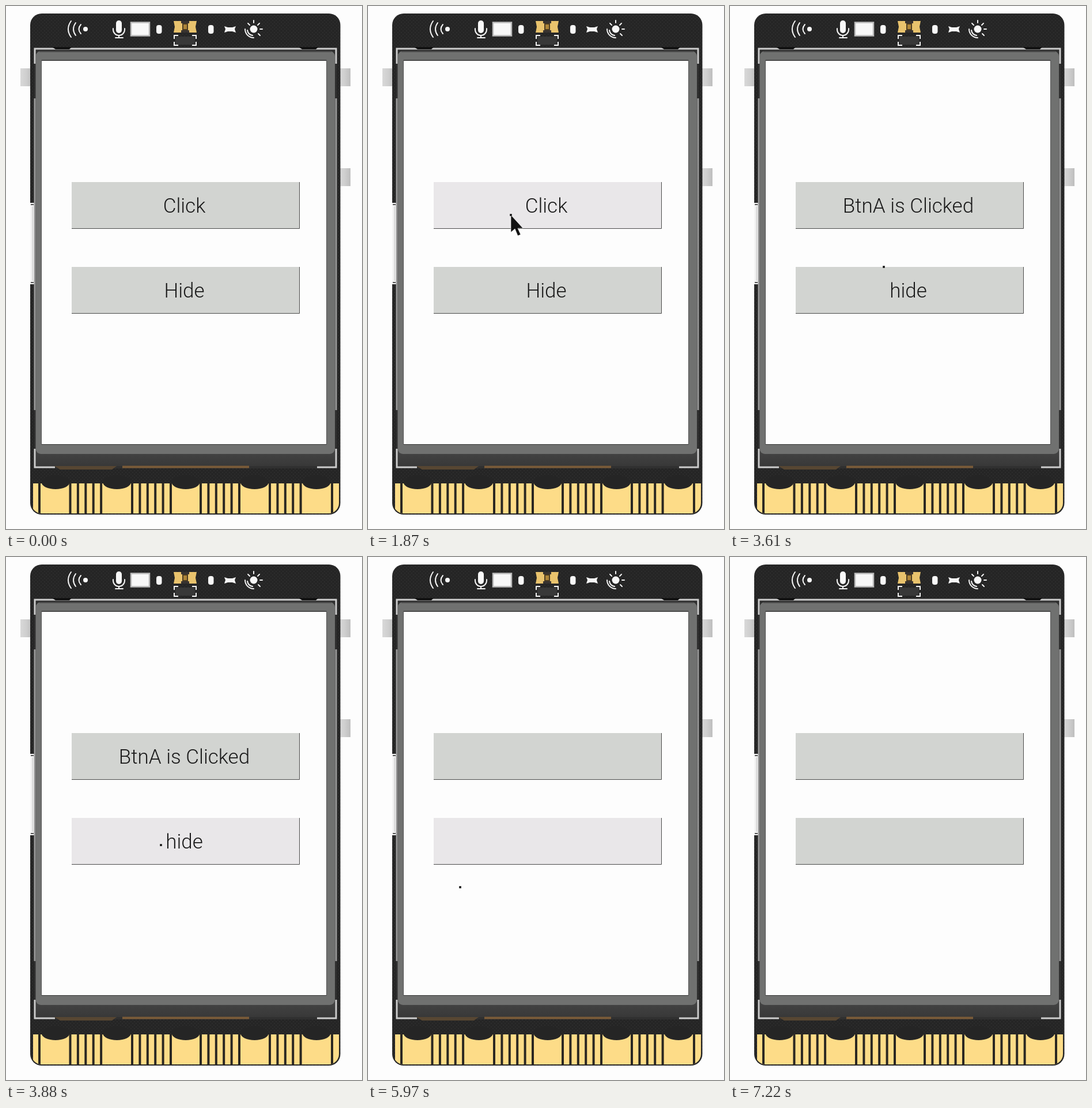
An HTML page that plays this animation: 618 by 906 pixels, repeating every 7.29 s.

```html
<!DOCTYPE html>
<html lang="en">
<head>
<meta charset="utf-8">
<title>Button demo</title>
<style>
  html, body { margin: 0; width: 100%; height: 100%; overflow: hidden; background: #fdfdfd; }
  svg { display: block; }
  .button { fill: #d2d4d1; }
  .button.lit { fill: #e9e7e9; }
  text { font: 300 35px Roboto, "Liberation Sans", sans-serif; text-anchor: middle; fill: #1a1a1a; }
  .line { fill: none; stroke: #f5f5f5; stroke-width: 2; }
</style>
</head>
<body>
<svg width="618" height="906" viewBox="0 0 618 906">
  <defs>
    <pattern id="weave" width="6" height="6" patternUnits="userSpaceOnUse">
      <rect width="6" height="6" fill="#252525"/>
      <path d="M0 0h2v2h-2zM3 3h2v2h-2z" fill="#2d2d2d"/>
    </pattern>
    <linearGradient id="tab">
      <stop stop-color="#d8d8d8"/><stop offset=".5" stop-color="#cfcfcf"/><stop offset="1" stop-color="#bebebe"/>
    </linearGradient>
    <linearGradient id="strip" x2="0" y2="1">
      <stop stop-color="#474747"/><stop offset="1" stop-color="#383838"/>
    </linearGradient>
    <clipPath id="outline"><rect x="44" y="15" width="534" height="864" rx="18"/></clipPath>
  </defs>

  <g fill="url(#tab)">
    <rect x="25" y="108" width="20" height="31"/>
    <rect x="578" y="108" width="20" height="31"/>
    <rect x="578" y="281" width="20" height="31"/>
  </g>
  <rect x="42" y="13" width="538.500" height="868" rx="20" fill="url(#weave)"/>

  <!-- sound, microphone and light icons -->
  <g class="line" stroke-linecap="round">
    <path d="M113 26q-10 14 0 28M121 29q-8 11 0 22M130 32q-7 8 0 16"/>
    <path d="M186 39v2a10 10 0 0 0 20 0v-2M196 51v4M190 55h13"/>
    <path d="M430 25v4M420 30l3 3M440 30l-3 3M441 40h4M438 48l3 3M415 40a15 15 0 0 0 15 15M419 42a11 11 0 0 0 9 9"/>
  </g>
  <g fill="#f8f8f8">
    <circle cx="138" cy="40" r="4"/>
    <rect x="191" y="25" width="10" height="22" rx="5"/>
    <rect x="217" y="28.500" width="32" height="23" stroke="#bbb" stroke-width="2.500"/>
    <rect x="261" y="33" width="9.500" height="15" rx="4"/>
    <rect x="351" y="33" width="9.500" height="15" rx="4"/>
    <path d="M379 35l6 2h8l6-2-2 5 2 6-6-2h-8l-6 2 2-6z"/>
    <circle cx="430" cy="40" r="6.500"/>
  </g>
  <path d="M291 26h40l-2 10 2 10h-40l2-10z" fill="#e9c36d"/>
  <path d="M304 26h14v4h-14zM304 42h14v4h-14z" fill="#383330"/>
  <rect x="307" y="31" width="8" height="10" fill="#ac8438" stroke="#4b3b22" stroke-width="2"/>
  <rect x="294" y="53" width="34" height="14" fill="#383838"/>
  <path class="line" d="M299 51h-7v6M323 51h7v6M292 62v6h7M330 62v6h-7"/>

  <!-- display module -->
  <rect x="49" y="73" width="525" height="728" fill="#303030"/>
  <rect x="42" y="341" width="8" height="141" fill="#f4f4f4"/>
  <path d="M46 347v129" stroke="#d8d8d8" stroke-width="2"/>
  <path d="M43 344h5M43 479h5" stroke="#555" stroke-width="2"/>
  <path d="M50 160V700M573 160V700" stroke="#999" stroke-width="3"/>
  <path d="M50 100V74H573V100M50 767V799H85M540 799H573V767" fill="none" stroke="#ccc" stroke-width="3"/>
  <path d="M80 71h34l-4 4h-24zM508 71h34l-4 4h-24z" fill="#111"/>
  <rect x="52" y="765" width="519" height="32" fill="url(#strip)"/>
  <path d="M84 797H192l-8 6H94z" fill="#574632"/>
  <path d="M202 798.500H422" stroke="#7a5b38" stroke-width="4"/>
  <rect x="51.500" y="78" width="519.500" height="698" rx="9" fill="#707170"/>
  <path d="M58 79H565" stroke="#4c4c4c" stroke-width="2"/>
  <rect x="61.500" y="93.500" width="495" height="666.500" fill="#3a3a3a"/>
  <rect x="62" y="95" width="494" height="664" fill="#fdfdfd"/>

  <g id="pads" clip-path="url(#outline)"></g>
  <g id="buttons"></g>
  <g id="cursor">
    <path id="arrow" d="M0 0V30L7 24L12 36L17 34L12 23H21Z" fill="#111" stroke="#fff" stroke-opacity=".6"/>
    <rect x="-2" y="-2" width="4" height="4" fill="#111" stroke="#fff" stroke-opacity=".4"/>
  </g>
</svg>
<script>
const LOOP = 7290;
const $ = id => document.getElementById(id);

function add(parent, tag, attrs) {
  const el = document.createElementNS("http://www.w3.org/2000/svg", tag);
  for (const key in attrs) el.setAttribute(key, attrs[key]);
  return parent.appendChild(el);
}

// Edge connector: gold row, scooped pads and separating bars
const pads = $("pads");
add(pads, "rect", { x: 47, y: 827, width: 531, height: 52, fill: "#fddc88" });
for (const cx of [86, 192.5, 312, 431.5, 539])
  add(pads, "ellipse", { cx, cy: 825, rx: 24.5, ry: 12, fill: "#252525" });
const bar = x => add(pads, "rect", { x, y: 826, width: 4, height: 54, fill: "#2b2822" });
[[56, 1], [109.5, 5], [217, 6], [336, 6], [456, 5], [564, 1]].forEach(([x, count]) => {
  for (let i = 0; i < count; i++) bar(x + i * 13.4);
});

function makeButton(y) {
  const face = add($("buttons"), "rect", { x: 114, y, width: 396, height: 81, class: "button" });
  add($("buttons"), "path", { d: `M509.500 ${y}v80.500H114`, fill: "none", stroke: "#4c4c4c" });
  const label = add($("buttons"), "text", { x: 309.5, y: y + 53 });
  return (lit, text) => {
    face.classList.toggle("lit", lit);
    label.textContent = text;
  };
}
const setClick = makeButton(305), setHide = makeButton(452);

// Pointer path: time, x, y
const path = [
  [830, 62, 238], [1530, 221, 341], [1870, 248, 362], [2280, 262, 368], [2880, 264, 369],
  [3140, 264, 369], [3880, 269, 499], [4080, 269, 499], [4620, 286, 480], [4880, 286, 480],
  [5550, 238, 516], [5970, 160, 572], [6150, 122, 604], [6320, 69, 640]
];

function pointerAt(t) {
  const i = path.findIndex(p => p[0] > t);
  if (i < 1) return null;
  const [t0, x0, y0] = path[i - 1], [t1, x1, y1] = path[i];
  const k = (t - t0) / (t1 - t0);
  return [x0 + (x1 - x0) * k, y0 + (y1 - y0) * k];
}

function draw(now) {
  const t = now % LOOP;
  const within = (from, to) => t >= from && t < to;
  const clicked = t >= 2350, hidden = t >= 4200;
  setClick(within(1600, 3400), hidden ? "" : clicked ? "BtnA is Clicked" : "Click");
  setHide(within(3670, 6040), hidden ? "" : clicked ? "hide" : "Hide");

  const pos = pointerAt(t);
  $("cursor").style.display = pos ? "" : "none";
  if (pos) $("cursor").setAttribute("transform", `translate(${pos.map(Math.round)})`);
  $("arrow").style.display = within(1600, 2350) ? "" : "none";
}

let start;
function tick(now) {
  start ??= now;
  draw(now - start);
  requestAnimationFrame(tick);
}
draw(0);
requestAnimationFrame(tick);
</script>
</body>
</html>
```
